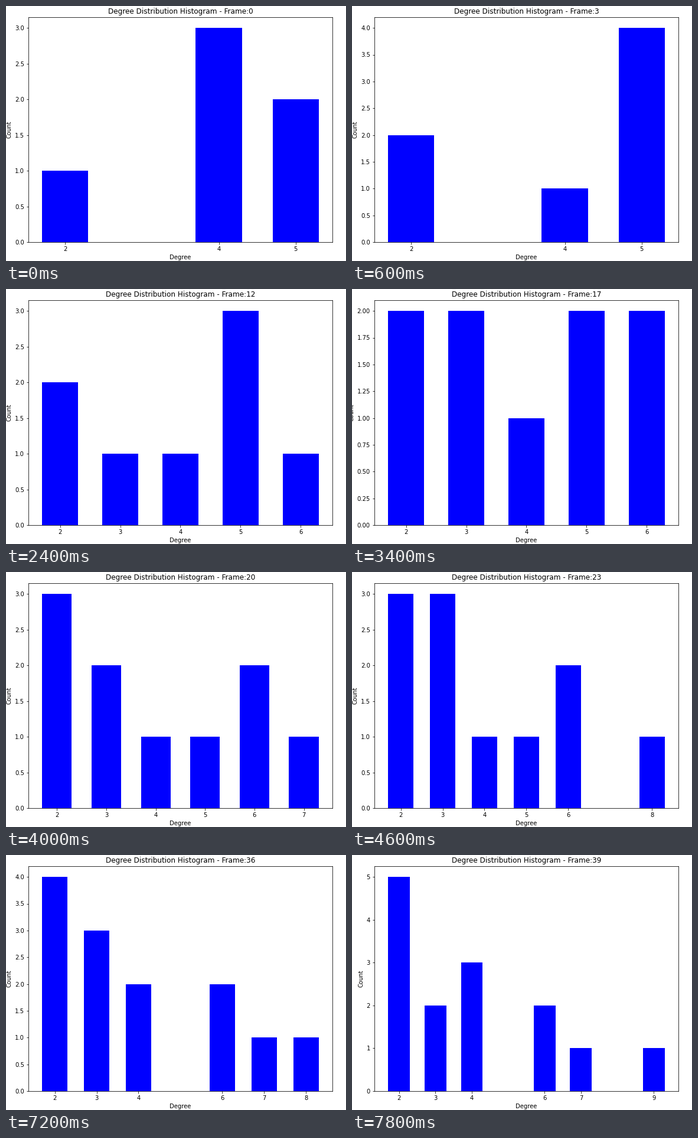
A matplotlib script for the animation above (8000 ms loop, 576 by 432 pixels).

```python
import numpy as np
import matplotlib.pyplot as plt
from matplotlib.animation import FuncAnimation

W, H, DPI = 576, 432, 72
FRAMES, INTERVAL = 40, 200
LEFT, TOP, RIGHT, BOTTOM = 37.85, 19, 553.05, 400  # axes box in pixels

START = [2, 4, 4, 4, 5, 5]
# Degrees of the two nodes each newcomer links to
LINKS = [(4, 4), (2, 5), (2, 5), (6, 5), (7, 2), (2, 6), (5, 3), (8, 3)]
FIRST_LINK, LINK_EVERY = 3, 5


def degree_counts(frame):
    """Number of nodes per degree after all links made up to this frame."""
    counts = np.bincount(START, minlength=12)
    joined = max(0, (frame - FIRST_LINK) // LINK_EVERY + 1)
    for pair in LINKS[:joined]:
        for degree in pair:
            counts[degree] -= 1
            counts[degree + 1] += 1
        counts[2] += 1
    return counts


fig = plt.figure(figsize=(W / DPI, H / DPI), dpi=DPI, facecolor="white")
ax = fig.add_axes([LEFT / W, 1 - BOTTOM / H, (RIGHT - LEFT) / W, (BOTTOM - TOP) / H])


def draw(frame):
    counts = degree_counts(frame)
    degrees = np.flatnonzero(counts)
    ax.clear()
    ax.bar(degrees, counts[degrees], width=0.6, color="b")
    ax.set_xticks(degrees)
    ax.set_title(f"Degree Distribution Histogram - Frame:{frame}")
    ax.set_xlabel("Degree")
    ax.set_ylabel("Count")
    return ax.patches


anim = FuncAnimation(fig, draw, frames=FRAMES, interval=INTERVAL,
                     repeat=True, repeat_delay=0, blit=False)
plt.show()
```
